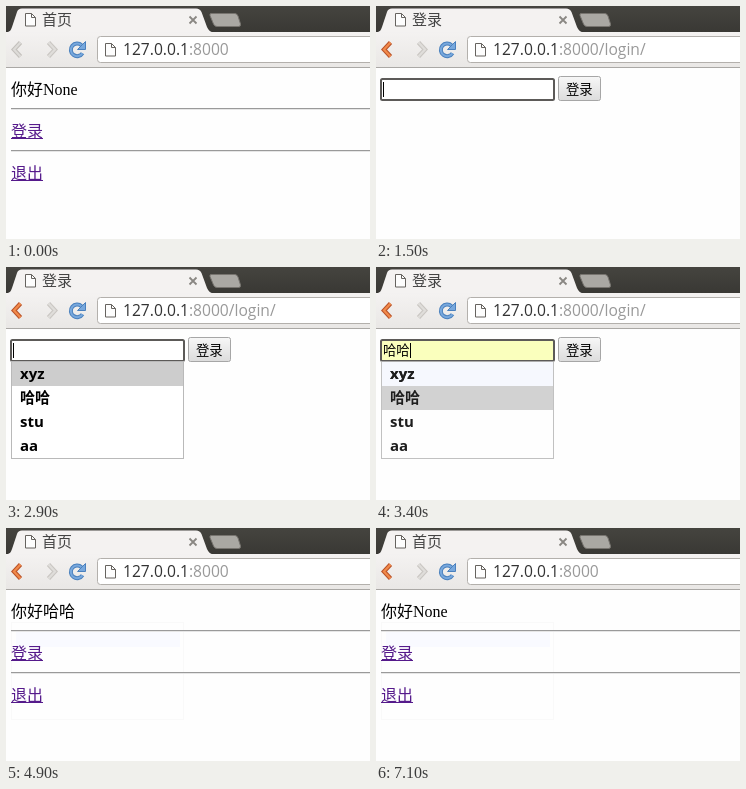
Animation, 364 px wide and 233 px high, one loop 8 s. Source, as an HTML page:

```html
<!DOCTYPE html>
<html lang="zh">
<head>
<meta charset="utf-8">
<title>登录</title>
<style>
  html, body { margin: 0; width: 100%; height: 100%; overflow: hidden; background: #fefefe; }
  svg { display: block; width: 100%; height: 100%; }
  text { white-space: pre; }
  .ui { font-family: "Open Sans", "Noto Sans CJK SC", "Noto Sans CJK", sans-serif; }
  .page { font: 16px "Liberation Serif", "Noto Sans CJK SC", "Noto Sans CJK", serif; }
  .field { font: 13.33px "Open Sans", "Noto Sans CJK SC", "Noto Sans CJK", sans-serif; }
  .item { font: bold 15px "Open Sans", "Noto Sans CJK SC", "Noto Sans CJK", sans-serif; }
</style>
</head>
<body>
<svg id="stage" viewBox="0 0 364 233">
  <defs>
    <linearGradient id="bar" x2="0" y2="1">
      <stop stop-color="#f4f2f1"/><stop offset="1" stop-color="#e9e7e5"/>
    </linearGradient>
    <linearGradient id="key" x2="0" y2="1">
      <stop stop-color="#f7f7f7"/><stop offset="1" stop-color="#dcdcdc"/>
    </linearGradient>
    <linearGradient id="keyDown" x2="0" y2="1">
      <stop stop-color="#d2d2d2"/><stop offset="1" stop-color="#ececec"/>
    </linearGradient>
    <linearGradient id="strip" x2="0" y2="1">
      <stop stop-color="#45443f"/><stop offset="1" stop-color="#393834"/>
    </linearGradient>
  </defs>
  <g id="chrome"></g>
  <g id="view"></g>
</svg>
<script>
const LOOP = 8000;
const NAMES = ['xyz', '哈哈', 'stu', 'aa'];
const chrome = document.getElementById('chrome');
const view = document.getElementById('view');

const rect = (x, y, w, h, fill, extra = '') =>
  `<rect x="${x}" y="${y}" width="${w}" height="${h}" fill="${fill}" ${extra}/>`;
const text = (x, y, str, cls, fill, extra = '') =>
  `<text x="${x}" y="${y}" class="${cls}" fill="${fill}" ${extra}>${str}</text>`;
const line = (d, color, width, extra = '') =>
  `<path d="${d}" fill="none" stroke="${color}" stroke-width="${width}" ${extra}/>`;
const shape = (d, fill, stroke) => `<path d="${d}" fill="${fill}" stroke="${stroke}"/>`;
const within = (t, a, b) => t >= a && t < b;

// Last value whose start time has passed
function pick(t, steps) {
  let value = steps[0][1];
  for (const [start, v] of steps) if (t >= start) value = v;
  return value;
}

function sheet(x, y) {
  return shape(`M${x + .5} ${y + .5}h6l4 4v8.500h-10z`, '#fdfdfd', '#66635f') +
    line(`M${x + 6.5} ${y + .5}v4h4`, '#66635f', 1);
}

function arrow(tip, dir, outer, inner) {
  const d = `M${tip + dir * 7.5} 36.500L${tip + dir} 43.500L${tip + dir * 7.5} 50.500`;
  return line(d, outer, 4.4) + line(d, inner, 2.2);
}

function reload() {
  const arc = 'M76.500 47.200A6.300 6.300 0 1 1 75.500 39.300';
  return line(arc, '#4a80bd', 4) + line(arc, '#78a8dd', 2) +
    shape('M79.500 35.500V43.500H71.500Z', '#78a8dd', '#4a80bd');
}

function stop() {
  const d = 'M66 38.500L76.500 49M76.500 38.500L66 49';
  return line(d, '#a8433c', 4.4) + line(d, '#d96a60', 2.4);
}

function drawChrome({ title, path, back, loading }) {
  return rect(0, 0, 364, 27, 'url(#strip)') +
    rect(0, 26, 364, 36, 'url(#bar)') +
    shape('M0 26.500C4 26 5 24 6 21L11 6Q12 2.500 16 2.500H190Q194 2.500 195.500 6L201 21Q203 26 208 26.500Z', '#f4f2f1', 'none') +
    shape('M205 7.500H229Q231 7.500 232 10L234.500 18Q235 20.500 232.500 20.500H211Q208.500 20.500 207.500 18L204 9.500Q203.500 7.500 205 7.500Z', '#aaa8a3', '#77746f') +
    sheet(19, 7) +
    text(36, 19, title, 'ui', '#444', 'font-size="15"') +
    line('M183.500 10.500L190.500 17.500M190.500 10.500L183.500 17.500', '#8a8783', 1.8) +
    (back ? arrow(7, 1, '#b9532a', '#f28a4a') : arrow(7, 1, '#c3c0bc', '#dddbd8')) +
    arrow(50, -1, '#c9c6c2', '#dfddda') +
    (loading ? stop() : reload()) +
    rect(91.5, 30.5, 290, 26, '#fff', 'rx="3" stroke="#b3b0ac"') +
    sheet(99, 37) +
    text(117, 49, `127.0.0.1<tspan fill="#999">:8000${path}</tspan>`, 'ui', '#333', 'font-size="15.600"') +
    rect(0, 61, 364, 1, '#aaa8a5');
}

function link(y, str, active) {
  const color = active ? '#f00' : '#551a8b';
  return text(5, y, str, 'page', color) + rect(5, y + 1, 32, 1, color);
}

const rule = y => rect(5, y, 359, 1, '#9a9a9a') + rect(5, y + 1, 359, 1, '#e6e6e6');

function drawHome({ user, pressed }) {
  return text(5, 89, '你好' + user, 'page', '#000') + rule(102) + link(131, '登录', pressed === 1) +
    rule(144) + link(173, '退出', pressed === 2);
}

function drawLogin({ value, caret, focus, hover, down }) {
  const border = focus ? '#5c5a58' : '#b4b4b4';
  const caretX = value ? 34 : 7;
  return rect(5, 73, 173, 21, value ? '#faffbd' : '#fff', `rx="${focus ? 1.5 : 0}" stroke="${border}" stroke-width="${focus ? 2 : 1.5}"`) +
    text(7, 88, value, 'field', '#000') +
    (caret ? rect(caretX, 76, 1, 15, '#000') : '') +
    rect(182.5, 70.5, 42, 24, `url(#${down ? 'keyDown' : 'key'})`, `rx="2" stroke="${hover ? '#8c8c8c' : '#a6a6a6'}"`) +
    text(190, 88, '登录', 'field', '#000');
}

function drawList({ selected, opacity }) {
  const rows = NAMES.map((name, i) => {
    const y = 95 + i * 24;
    return (i === selected ? rect(6, y, 171, 24, '#cdcdcd') : '') + text(14, y + 17, name, 'item', '#000');
  });
  return `<g opacity="${opacity}">` + rect(5.5, 94.5, 172, 97, '#fff', 'stroke="#b9b9b9"') +
    (opacity < 1 ? rect(6, 95, 171, 24, '#f6f8ff') + text(14, 112, NAMES[0], 'item', '#000') : '') +
    rows.join('') + '</g>';
}

// Faint trace the closed list leaves on the page
function drawTrace(home) {
  return rect(5.5, 94.5, 172, 97, 'none', 'stroke="#f9f9f9"') +
    (home ? rect(10, 104, 164, 15, '#f9faff')
      : rect(8, 97, 167, 22, '#f9faff') + text(14, 112, NAMES[0], 'item', '#fff'));
}

function render(t) {
  const login = within(t, 800, 4900);
  const loginPath = within(t, 700, 4900);
  const bar = drawChrome({
    title: login ? '登录' : '首页',
    path: loginPath ? '/login/' : '',
    back: t >= 700,
    loading: within(t, 700, 800) || within(t, 4700, 4900) || within(t, 7000, 7100)
  });

  let body = t >= 3600 ? drawTrace(!login) : '';
  if (login) {
    body += drawLogin({
      value: pick(t, [[0, ''], [2600, NAMES[0]], [2900, ''], [3000, NAMES[1]]]),
      caret: pick(t, [[0, 0], [1500, 1], [2000, 0], [2900, 1], [3000, 0], [3400, 1], [3900, 0], [4500, 1]]),
      focus: t >= 1500,
      hover: within(t, 3900, 4500),
      down: within(t, 4600, 4700)
    });
    if (within(t, 2300, 3600)) {
      body += drawList({
        selected: pick(t, [[0, -1], [2600, 0], [3000, 1]]),
        opacity: pick(t, [[0, 1], [3400, .88], [3500, .4]])
      });
    }
  } else {
    body += drawHome({
      user: within(t, 4900, 7100) ? NAMES[1] : 'None',
      pressed: within(t, 500, 800) ? 1 : within(t, 6800, 7100) ? 2 : 0
    });
  }
  update(chrome, bar);
  update(view, body);
}

function update(node, markup) {
  if (node.markup === markup) return;
  node.markup = markup;
  node.innerHTML = markup;
}

const start = performance.now();
function tick() {
  render((performance.now() - start) % LOOP);
  requestAnimationFrame(tick);
}
tick();
</script>
</body>
</html>
```
